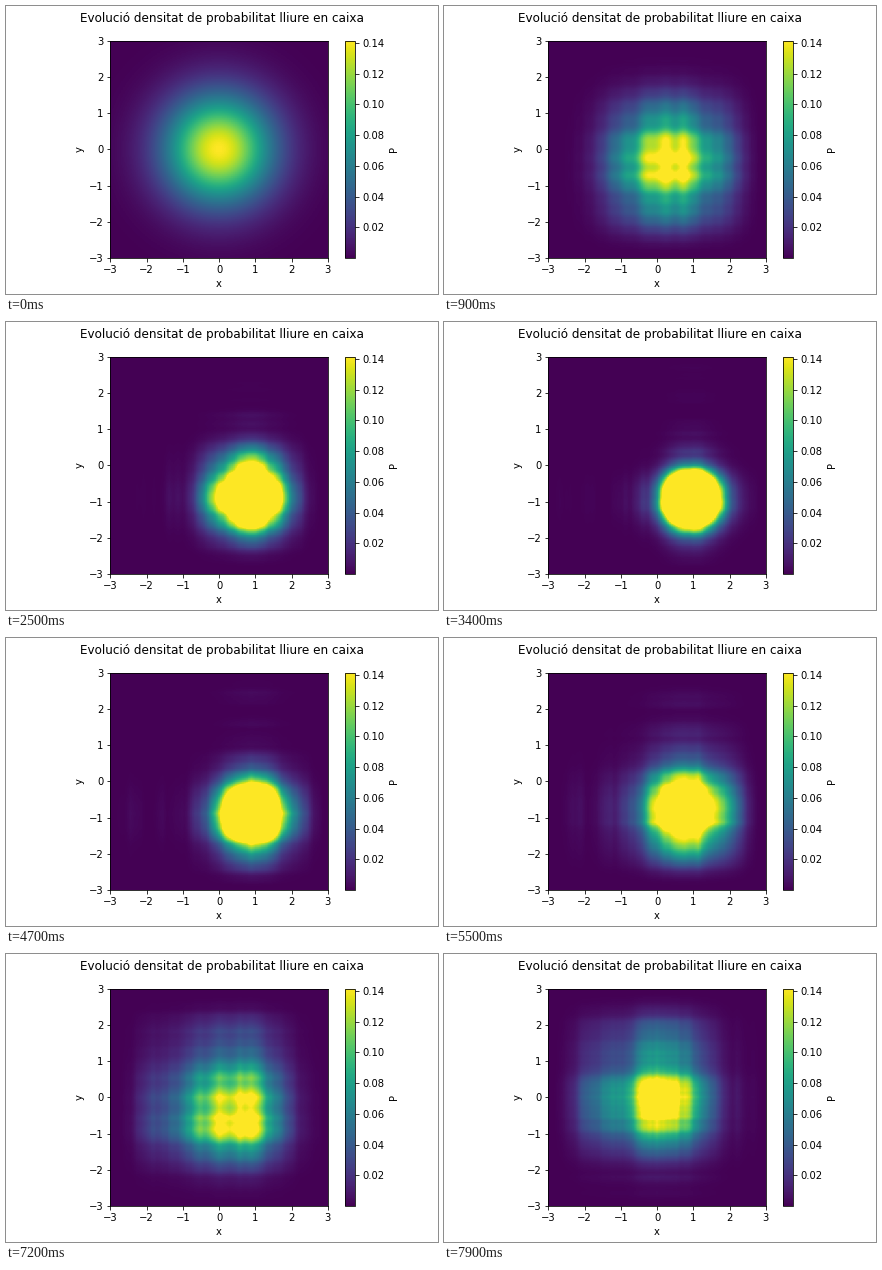
These frames come from a looping animation (432 by 288 pixels, 8 s). A matplotlib script:

```python
import numpy as np
import matplotlib.pyplot as plt
from matplotlib.animation import FuncAnimation

FRAMES, INTERVAL = 80, 100
L, N = 3.0, 100           # half box size, grid cells
DT, STEPS = 0.02, 2       # time step, steps per frame
WIDTH, MOMENTUM, OMEGA = 1.5, 1.0, 1.0

plt.rcParams.update({
    "font.family": "DejaVu Sans",
    "font.size": 10,
    "figure.subplot.bottom": 0.125,
    "savefig.dpi": "figure",
})


def propagator(x):
    """Crank-Nicolson step for an oscillator between hard walls."""
    n, dx = len(x), x[1] - x[0]
    hop = np.eye(n, k=1) + np.eye(n, k=-1)
    h = (2 * np.eye(n) - hop) / (2 * dx**2) + np.diag(0.5 * (OMEGA * x) ** 2)
    half = 0.5j * DT * h
    return np.linalg.solve(np.eye(n) + half, np.eye(n) - half)


def evolve():
    """One-dimensional density on the full grid for every frame."""
    x = np.linspace(-L, L, N + 1)
    psi = np.exp(-x**2 / (2 * WIDTH**2) + 1j * MOMENTUM * x)
    psi /= (np.pi * WIDTH**2) ** 0.25
    step = np.linalg.matrix_power(propagator(x[1:-1]), STEPS)
    out = [np.abs(psi) ** 2]
    for _ in range(FRAMES - 1):
        psi[1:-1] = step @ psi[1:-1]
        psi[[0, -1]] = 0
        out.append(np.abs(psi) ** 2)
    return out


def density(i):
    # The y motion mirrors the x motion, so the state is a product.
    g = profiles[i]
    return np.outer(g[::-1], g)


profiles = evolve()
start = density(0)

fig, ax = plt.subplots(figsize=(6, 4), dpi=72)
im = ax.imshow(start, origin="lower", extent=(-L, L, -L, L), cmap="viridis",
               vmin=start.min(), vmax=start.max())
ax.set_xlabel("x")
ax.set_ylabel("y")
ax.set_xticks(range(-3, 4))
ax.set_yticks(range(-3, 4))
fig.colorbar(im, ax=ax, label="P")
fig.suptitle("Evolució densitat de probabilitat lliure en caixa")


def update(i):
    im.set_data(density(i))
    return (im,)


anim = FuncAnimation(fig, update, frames=FRAMES, interval=INTERVAL,
                     repeat=True, repeat_delay=0, blit=False)
plt.show()
```
